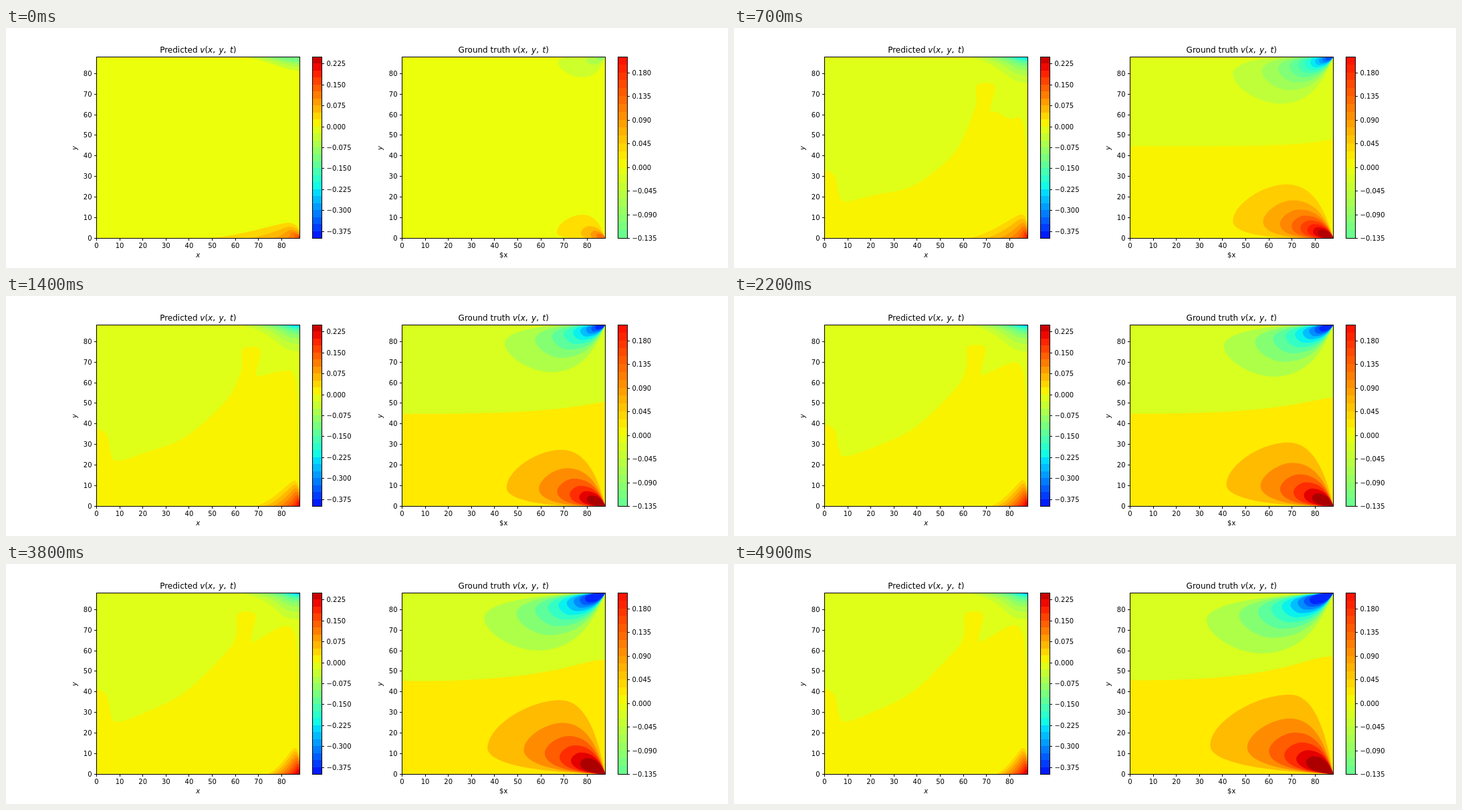
Animation, 1080 px wide and 360 px high, one loop 5 s. Source, as an HTML page with a canvas:

```html
<!DOCTYPE html>
<html lang="en">
<head>
<meta charset="utf-8">
<title>Predicted and true field</title>
<style>
html, body { margin: 0; width: 100%; height: 100%; overflow: hidden; background: #fff; }
canvas { display: block; }
</style>
</head>
<body>
<canvas id="stage" width="1080" height="360"></canvas>
<script>
const ctx = document.getElementById('stage').getContext('2d');
const LEFT = 135, RIGHT = 592, TOP = 43, BOTTOM = 315, WIDE = 304.5, TALL = 272;
const FONT = '"DejaVu Sans", Verdana, sans-serif';

// Resting shape of the left panel's zero line.
const RIDGE = [
  [135, 186], [151, 197], [157, 225], [167, 236], [210, 221], [270, 189], [330, 130],
  [342, 112], [345, 95], [345, 76], [358, 71], [373, 77], [366, 112], [375, 114],
  [412, 93], [430, 99], [436, 140], [439, 240]
];

const clamp = v => Math.max(0, Math.min(1, v));
const mix = (a, b, p) => a + (b - a) * p;
const growth = n => (n / 49) ** .35;
const decay = n => Math.exp(-n / 9);

function jet(value) {
  const p = .637 + 1.25 * value;
  const r = Math.min((p - .35) / .31, 1 - Math.max(0, p - .89) / .22);
  const g = Math.min((p - .125) / .25, (.91 - p) / .27);
  const b = Math.min(.5 + p / .22, (.65 - p) / .31);
  return `rgb(${[r, g, b].map(c => Math.round(255 * clamp(c)))})`;
}

function box(color, x, y, w, h) {
  ctx.fillStyle = color;
  ctx.fillRect(x, y, w, h);
}

// Runs draw with the origin in a right-hand corner and the axes pointing inwards.
function inCorner(x, atTop, draw) {
  ctx.save();
  ctx.translate(x + WIDE, atTop ? TOP : BOTTOM);
  ctx.scale(-1, atTop ? 1 : -1);
  ctx.beginPath();
  ctx.rect(0, 0, WIDE, TALL);
  ctx.clip();
  draw();
  ctx.restore();
}

function teardrop(w, h, peak, tip, g) {
  const px = w * peak, ty = h * tip;
  ctx.beginPath();
  ctx.moveTo(0, 0);
  ctx.bezierCurveTo(w * mix(.95, .55, g), ty * mix(-.4, .08, g), w, ty * .4, w, ty);
  ctx.bezierCurveTo(w, mix(ty, h, .45), mix(px, w, .45), h, px, h);
  ctx.bezierCurveTo(px * .4, h, px * .15, h * .45, 0, 0);
  ctx.fill();
}

// Nested contours whose size falls off with the logarithm of their level.
function plume(n, atTop, { strength, reach, height, peak, tip, tilt }) {
  const g = growth(n), step = n < 9 ? .03 : .04;
  const sizeAt = v => Math.log(strength / v) ** (1.3 - .3 * g);
  const first = n ? step : step / 2;
  for (let v = first; v < Math.min(strength, atTop ? .37 : .27); v += step) {
    const size = sizeAt(v), inner = 1 - size / sizeAt(first);
    if (reach * size < 9) break;
    ctx.fillStyle = jet((atTop ? -1 : 1) * (v + step / 2));
    teardrop(reach * size, height * size, mix(peak, .85, inner), tip + tilt * inner, g);
  }
}

function truth(n) {
  const g = growth(n), half = n < 9 ? .0125 : .02;
  box(jet(n ? -half : 0), RIGHT, TOP, WIDE, TALL);
  if (n) {
    const end = Math.min(176, 194 - 55 * g);
    ctx.fillStyle = jet(half);
    ctx.beginPath();
    ctx.moveTo(RIGHT, 177 - 3 * g ** 6);
    ctx.bezierCurveTo(820, 178, 857, end + 24 * (1 - g) - 3, RIGHT + WIDE, end);
    ctx.lineTo(RIGHT + WIDE, BOTTOM);
    ctx.lineTo(RIGHT, BOTTOM);
    ctx.fill();
  }
  inCorner(RIGHT, false, () => plume(n, false, {
    strength: mix(.22, .4, clamp(2 * g)), reach: mix(20, 80, g), height: mix(9.7, 51.7, g ** 1.3),
    peak: mix(.48, .35, g ** 3), tip: mix(.26, .36, g), tilt: .4
  }));
  inCorner(RIGHT, true, () => plume(n, true, {
    strength: mix(.13, .6, g ** .6), reach: mix(26, 70, g), height: mix(11.4, 33.6, g),
    peak: mix(.48, .57, g), tip: mix(.28, .45, g), tilt: .2
  }));
}

// The knob slides left while the slope around it rises to rest.
function ridge(n) {
  const shift = Math.min(1, 2.1 * decay(n));
  const points = RIDGE.map(([x, y]) => x > 340 && x < 380
    ? [x + 18 * shift, y + 12 * shift]
    : [x, y + shift * (42 - 17 * Math.cos((x - 165) * Math.PI / 170))]);
  const last = points.length - 1;
  ctx.beginPath();
  ctx.moveTo(...points[0]);
  for (let i = 0; i < last; i++) {
    const b = points[i], c = points[i + 1], a = points[i - 1] || b, d = points[i + 2] || c;
    ctx.bezierCurveTo(b[0] + (c[0] - a[0]) / 6, b[1] + (c[1] - a[1]) / 6,
      c[0] - (d[0] - b[0]) / 6, c[1] - (d[1] - b[1]) / 6, ...c);
  }
  ctx.lineTo(LEFT + WIDE, BOTTOM);
  ctx.lineTo(LEFT, BOTTOM);
  ctx.fill();
}

function hotCorner(n) {
  const d = decay(n);
  for (let i = 0; i < 9; i++) {
    const s = 1 - i / 10;
    const x = (47 + 87 * d) * s ** (1.3 + 4 * d);
    const y = (39 - 16 * d * d) * s ** (1.3 + 1.5 * d);
    const px = Math.min(x, (8 + 10 * d * d) * s);
    ctx.fillStyle = jet(.0375 + .025 * i);
    ctx.beginPath();
    ctx.moveTo(0, 0);
    ctx.lineTo(x, 0);
    ctx.bezierCurveTo(x * .6, y * .2, px + x * .12, y * .95, px, y);
    ctx.quadraticCurveTo(px * .3, y, 0, y * (.65 - .15 * d));
    ctx.fill();
  }
}

function coldCorner(n) {
  const g = growth(n), count = Math.round(4 + 8 * g);
  for (let i = 0; i < count; i++) {
    const x = 90 * .85 ** i, y = (40 - 19 * decay(n) ** 4) * .72 ** i;
    ctx.fillStyle = jet(-.0375 - .025 * i);
    ctx.beginPath();
    ctx.moveTo(0, 0);
    ctx.lineTo(x, 0);
    ctx.bezierCurveTo(x * mix(.5, .24, g), y * mix(.2, .38, g),
      x * mix(.3, .48, g), y, 0, y);
    ctx.fill();
  }
}

function prediction(n) {
  box(jet(n ? -.0125 : 0), LEFT, TOP, WIDE, TALL);
  if (n) {
    ctx.fillStyle = jet(.0125);
    ridge(n);
  }
  inCorner(LEFT, false, () => hotCorner(n));
  inCorner(LEFT, true, () => coldCorner(n));
}

function text(str, x, y, align = 'center', size = 10, style = '') {
  ctx.font = `${style} ${size}px ${FONT}`;
  ctx.textAlign = align;
  ctx.fillStyle = '#000';
  ctx.fillText(str, x, y);
  return ctx.measureText(str).width;
}

// Letters of the formula are slanted, commas are followed by a wider space.
function title(words, center) {
  const parts = [words + ' ', ...'v(x,y,t)'];
  const style = s => /^[a-z]$/.test(s) ? 'italic' : '';
  const gap = s => s === ',' ? 5.5 : 0;
  const width = s => {
    ctx.font = `${style(s)} 12px ${FONT}`;
    return ctx.measureText(s).width + gap(s);
  };
  let x = center - parts.reduce((sum, s) => sum + width(s), 0) / 2;
  for (const s of parts) x += text(s, x, 37, 'left', 12, style(s)) + gap(s);
}

function axes(x0, words, xLabel, xStyle) {
  const center = x0 + WIDE / 2;
  ctx.strokeStyle = '#000';
  ctx.lineWidth = 1;
  ctx.strokeRect(x0 + .5, TOP + .5, 304, TALL);
  for (let v = 0; v < 90; v += 10) {
    const x = x0 + v * WIDE / 88, y = BOTTOM - v * TALL / 88;
    box('#000', Math.round(x), BOTTOM + 1, 1, 3);
    box('#000', x0 - 3, Math.round(y), 3, 1);
    text(v, x + .5, 330);
    text(v, x0 - 6.5, Math.round(y + 4), 'right');
  }
  title(words, center);
  text(xLabel, center, 344, 'center', 10, xStyle);
  ctx.save();
  ctx.translate(x0 - 29, 180);
  ctx.rotate(-Math.PI / 2);
  text('y', 0, 0, 'center', 10, 'italic');
  ctx.restore();
}

function colorbar(x, low, step, count, firstTick, tickStep, ticks) {
  const band = TALL / count;
  for (let i = 0; i < count; i++) {
    const y = Math.round(BOTTOM - (i + 1) * band);
    box(jet(low + (i + .5) * step), x, y, 14, Math.round(BOTTOM - i * band) - y);
  }
  ctx.strokeRect(x + .5, TOP + .5, 14, TALL);
  for (let i = 0; i < ticks; i++) {
    const v = firstTick + i * tickStep, y = BOTTOM - (v - low) / step * band;
    box('#000', x + 15, Math.round(y), 3, 1);
    text((v < -1e-6 ? '\u2212' : '') + Math.abs(v).toFixed(3), x + 21.5, Math.round(y + 4), 'left');
  }
}

function draw(now) {
  const n = Math.floor(now % 5000 / 100);
  box('#fff', 0, 0, 1080, 360);
  prediction(n);
  truth(n);
  axes(LEFT, 'Predicted', 'x', 'italic');
  axes(RIGHT, 'Ground truth', '$x', '');
  colorbar(458, -.4, .025, 26, -.375, .075, 9);
  colorbar(915, -.135, .015, 23, -.135, .045, 8);
}

const start = performance.now();
function tick() {
  draw(performance.now() - start);
  requestAnimationFrame(tick);
}
tick();
</script>
</body>
</html>
```
